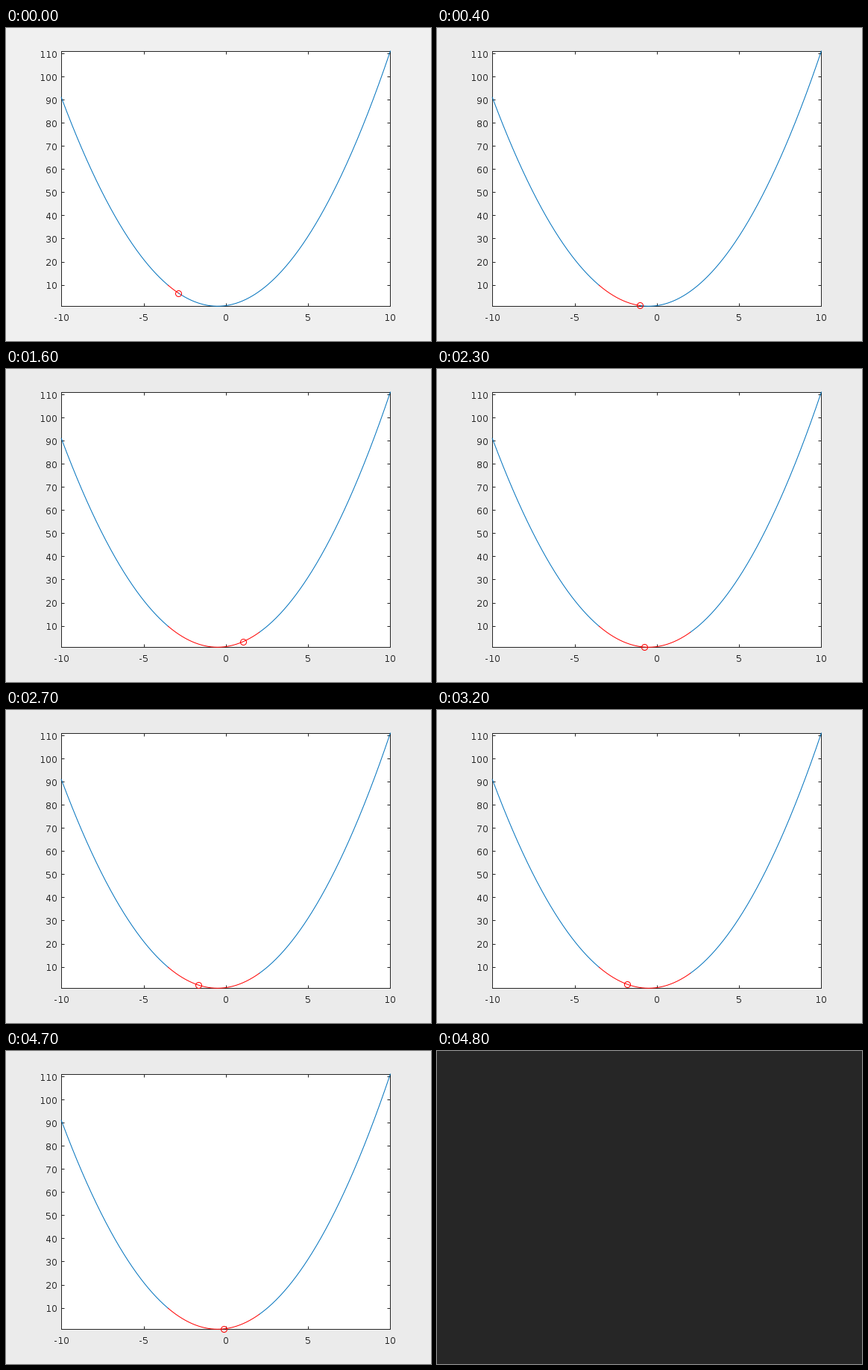
A matplotlib script that plays this animation: 570 px wide and 420 px high, repeating every 10 s.

```python
import numpy as np
import matplotlib.pyplot as plt
from matplotlib.animation import FuncAnimation

W, H, DPI = 570, 420, 96
PX = 72 / DPI  # points per pixel
FRAMES, STEP_MS, BLACKOUT = 100, 100, 48
INK, BLUE, RED = "#262626", "#0072BD", "#FF0000"
LEFT, RIGHT, TOP, BOTTOM = 74.2, 515.45, 31, 373.3  # plot box in pixels

# Turning points of the swing, and how much each swing eases at its ends
TURN_STEP = [-1.9, 11, 29.2, 46.5]
TURN_X = [-3.5, 2.03, -2.05, -0.11]
EASE = 0.4


def parabola(x):
    return x**2 + x + 1


def position(t):
    swing = np.interp(t, TURN_STEP, range(len(TURN_STEP)))
    k = int(swing)
    s = swing - k
    s += EASE * (s * s * (3 - 2 * s) - s)
    return np.interp(k + s, range(len(TURN_X)), TURN_X)


plt.rcParams.update({
    "font.family": "DejaVu Sans",
    "axes.unicode_minus": False,
    "text.hinting": "default",
    "text.hinting_factor": 1,
})

fig = plt.figure(figsize=(W / DPI, H / DPI), dpi=DPI)
ax = fig.add_axes([LEFT / W, 1 - BOTTOM / H, (RIGHT - LEFT) / W, (BOTTOM - TOP) / H])
ax.set(xlim=(-10, 10), ylim=(0.75, 111),
       xticks=range(-10, 11, 5), yticks=range(10, 111, 10))
ax.tick_params(direction="in", top=True, right=True, length=4.4 * PX,
               width=PX, color=INK, labelcolor=INK, labelsize=13 * PX)
ax.tick_params(axis="x", pad=8.5 * PX)
ax.tick_params(axis="y", pad=5.6 * PX)
for spine in ax.spines.values():
    spine.set(linewidth=PX, color=INK)

style = dict(lw=PX, clip_on=False, zorder=3)
arms = [ax.plot([], [], color=BLUE, **style)[0] for _ in range(2)]
trail, = ax.plot([], [], color=RED, **style)
ball, = ax.plot([], [], "o", mfc="none", mec=RED, ms=8 * PX, mew=PX,
                clip_on=False, zorder=4)


def trace(line, start, end):
    x = np.linspace(start, end, 200)
    line.set_data(x, parabola(x))


def draw(n):
    lit = n < BLACKOUT
    ax.set_visible(lit)
    if not lit:
        fig.set_facecolor(INK)
        return []
    fig.set_facecolor("#F0F0F0" if n == 0 else "#EBEBEB")
    x = position(n)
    reach = max(position(t) for t in range(n + 1))
    trace(arms[0], -10, TURN_X[0])
    trace(trail, TURN_X[0], reach)
    trace(arms[1], reach, 10)
    ball.set_data([x], [parabola(x)])
    return [*arms, trail, ball]


anim = FuncAnimation(fig, draw, frames=FRAMES, init_func=lambda: draw(0),
                     interval=STEP_MS, repeat=True, repeat_delay=0, blit=False)
plt.show()
```
